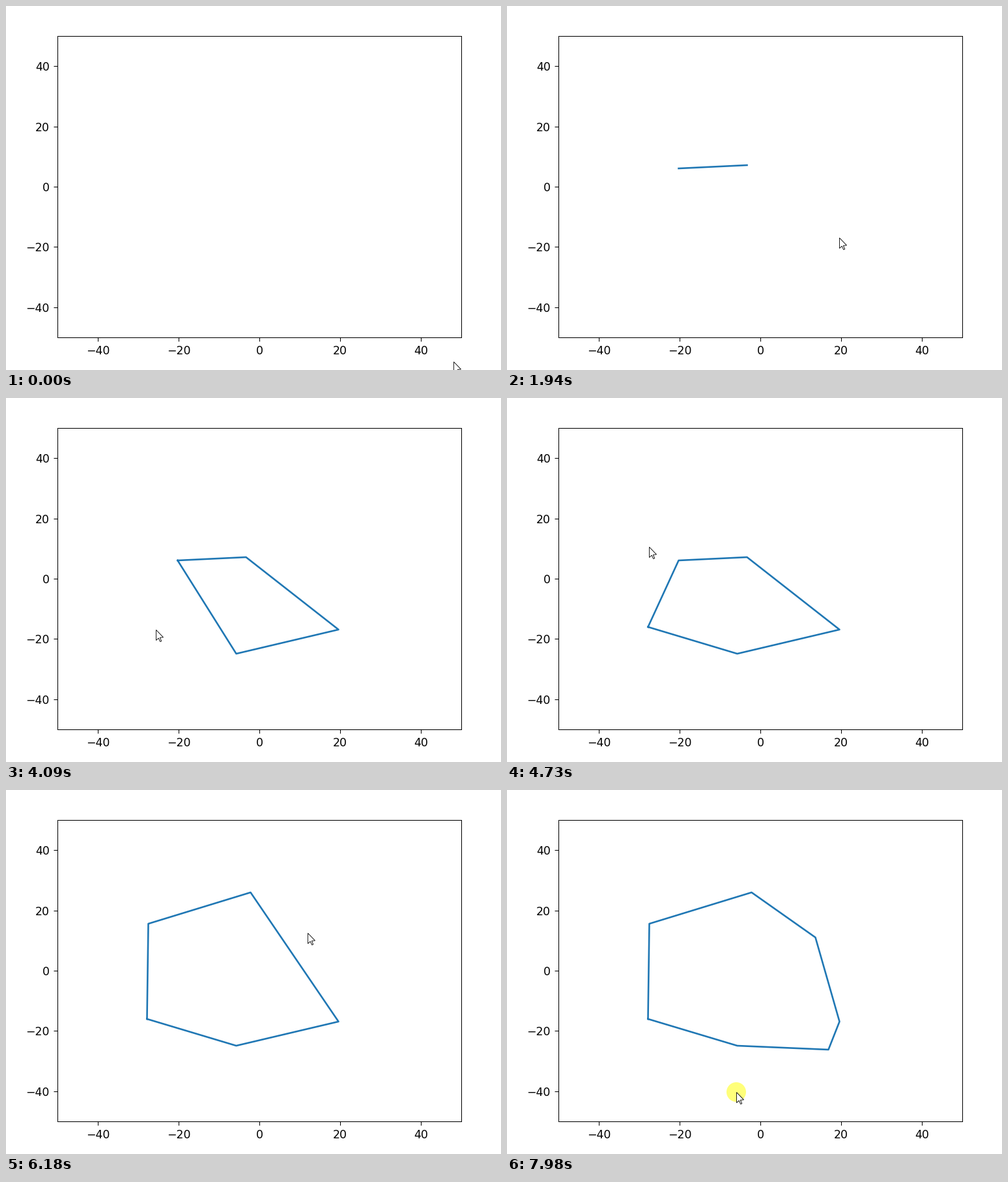
Recreate the animation shown at these times as a matplotlib script. Size 760 by 558 pixels, loop 8 s.

```python
import numpy as np
import matplotlib.pyplot as plt
from matplotlib.animation import FuncAnimation
from matplotlib.patches import Circle, Polygon

W, H, DPI = 760, 558, 125
STEP, LOOP = 20, 8000
LEFT, TOP, AX_W, AX_H = 79, 46, 620, 462

# Pointer timing in ms: longest move, button held, delay until the redraw
MOVE, HOLD, REDRAW = 400, 140, 240

START = (687, 545)
# x, y, arrival time, wait before the click (None: no click)
STOPS = [
    (263, 249, 440, 20),
    (384, 234, 820, None),
    (368, 244, 1180, 0),
    (510, 355, 1950, 320),
    (353, 392, 3175, 200),
    (216, 351, 4160, 0),
    (218, 205, 4820, 140),
    (375, 157, 5640, 0),
    (473, 226, 6260, 0),
    (344, 264, 6760, None),
    (493, 398, 7340, 100),
    (352, 463, 7920, 20),
]
CLICKS = [(x, y, t + wait) for x, y, t, wait in STOPS if wait is not None]

ARROW = np.array([(0, 0), (0, 16), (3.7, 12.6), (6.2, 18), (8.2, 17.2),
                  (5.9, 11.8), (11, 11.4)])


def pointer(t):
    """Tip of the pointer: an eased move to each stop in turn."""
    pos, free = np.array(START, float), 0
    for x, y, arrive, wait in STOPS:
        leave = max(free, arrive - MOVE)
        s = np.clip((t - leave) / (arrive - leave), 0, 1)
        pos += (np.array((x, y)) - pos) * s * s * (3 - 2 * s)
        if s < 1:
            break
        free = arrive if wait is None else arrive + wait + HOLD
    return np.round(pos)


def cross(o, a, b):
    return (a[0] - o[0]) * (b[1] - o[1]) - (a[1] - o[1]) * (b[0] - o[0])


def chain(pts):
    out = []
    for p in pts:
        while len(out) > 1 and cross(out[-2], out[-1], p) <= 0:
            out.pop()
        out.append(p)
    return out


def hull(pts):
    """Outline by the monotone chain method; closed from three points on."""
    pts = sorted(pts)
    if len(pts) > 2:
        pts = chain(pts) + chain(pts[::-1])[1:]
    return np.array(pts, float).reshape(-1, 2).T


def to_data(x, y):
    return (100 * (x + 0.5 - LEFT) / AX_W - 50,
            50 - 100 * (y - TOP) / AX_H)


plt.rcParams.update({"axes.linewidth": 0.6, "xtick.major.width": 0.6,
                     "ytick.major.width": 0.6})
fig = plt.figure(figsize=(W / DPI, H / DPI), dpi=DPI, facecolor="white")
ax = fig.add_axes([LEFT / W, 1 - (TOP + AX_H) / H, AX_W / W, AX_H / H])
ticks = range(-40, 41, 20)
ax.set(xlim=(-50, 50), ylim=(-50, 50), xticks=ticks, yticks=ticks)
outline, = ax.plot([], [], color="C0", lw=1.5)

overlay = fig.add_axes([0, 0, 1, 1])
overlay.set(xlim=(0, W), ylim=(H, 0))
overlay.axis("off")
glow = overlay.add_patch(Circle((0, 0), 15, fc="yellow", ec="none",
                                alpha=0.52))
arrow = overlay.add_patch(Polygon(ARROW, closed=True, fc="white", ec="black",
                                  lw=0.5, joinstyle="miter", zorder=3))


def draw(n):
    t = n * STEP
    outline.set_data(*hull([to_data(x, y) for x, y, down in CLICKS
                            if t >= down + REDRAW]))
    held = [(x, y) for x, y, down in CLICKS if down <= t < down + HOLD]
    glow.set_visible(bool(held))
    if held:
        glow.center = held[0]
    arrow.set_xy(ARROW + pointer(t) + 0.5)
    return outline, glow, arrow


anim = FuncAnimation(fig, draw, frames=LOOP // STEP, interval=STEP,
                     repeat=True, repeat_delay=0)
plt.show()
```
